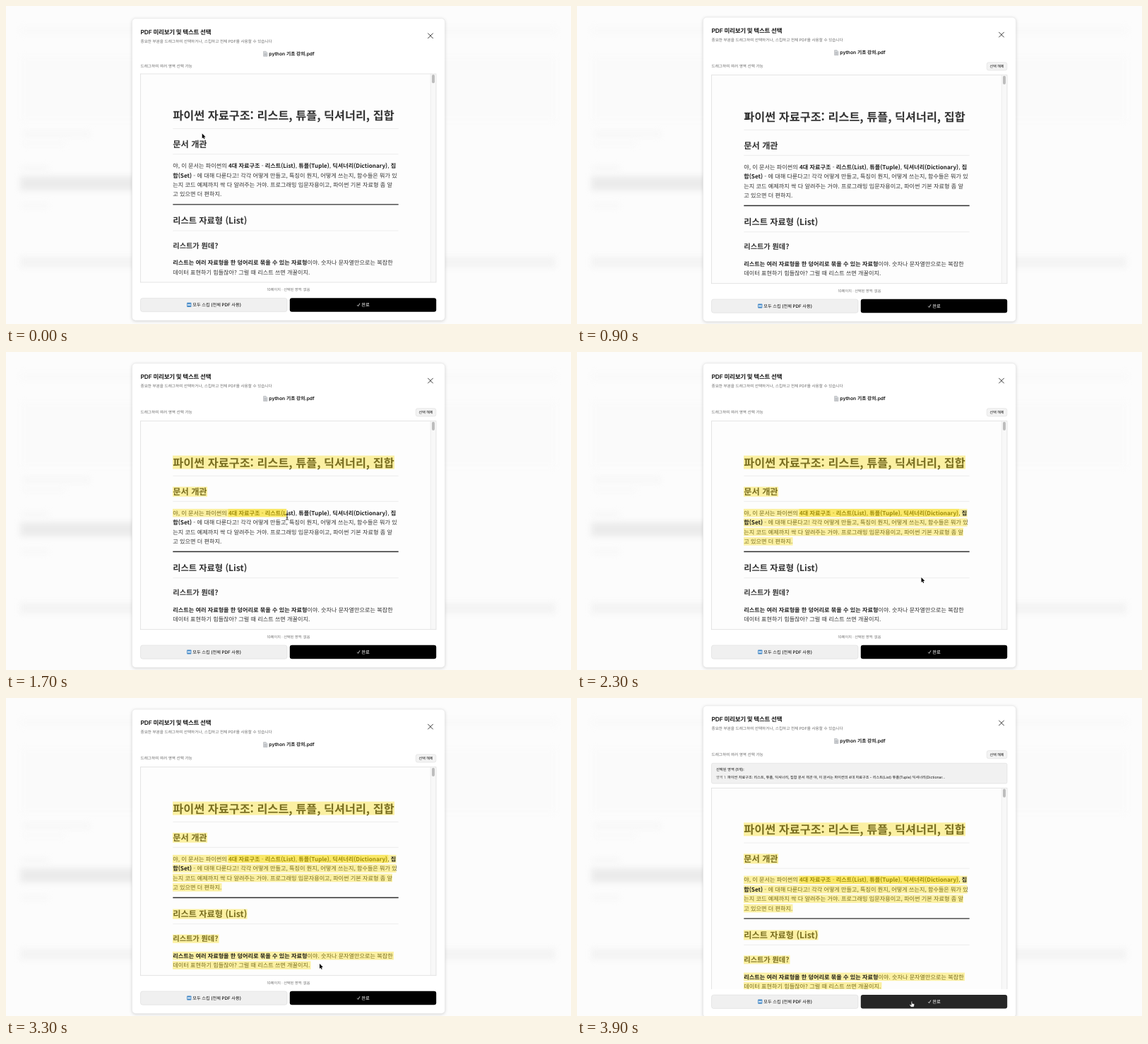
An HTML page that plays this animation: 800 by 450 pixels, repeating every 4000 ms.

```html
<!DOCTYPE html>
<html lang="ko">
<head>
<meta charset="utf-8">
<title>PDF 미리보기</title>
<style>
html, body { margin: 0; width: 100%; height: 100%; overflow: hidden; background: #fcfcfc; }
svg { display: block; }
text { font-family: Inter, 'Noto Sans CJK KR', 'Noto Sans CJK', sans-serif; text-rendering: geometricPrecision; white-space: pre; fill: #111; }
.page text { font-family: 'Noto Sans CJK KR', 'Noto Sans CJK', sans-serif; fill: #333; }
.page tspan { font-weight: 700; fill: #222; }
.title { font-size: 8.5px; font-weight: 600; letter-spacing: -.025em; }
.small { font-size: 5.6px; }
.muted { fill: #6b6b6b; }
.h1 { font-size: 16.28px; font-weight: 700; }
.h2 { font-size: 12.2px; font-weight: 700; }
.h3 { font-size: 10.17px; font-weight: 700; }
.p { font-size: 8.15px; }
.mid { text-anchor: middle; }
.rule { stroke: #e9e9e9; stroke-width: .8; }
.mark { fill: rgb(247, 216, 0); fill-opacity: .36; }
.under { fill: #fdf2a6; mix-blend-mode: multiply; }
#backdrop { filter: blur(4px); }
#modal { filter: drop-shadow(0 1px 2px rgba(0, 0, 0, .15)); }
</style>
</head>
<body>
<svg width="800" height="450" viewBox="0 0 800 450">
  <rect width="800" height="450" fill="#fcfcfc"/>
  <g id="backdrop">
    <rect x="20" y="30" width="760" height="9" fill="#f9f9f9"/>
    <rect x="22" y="72" width="756" height="90" fill="#fafafa"/>
    <rect x="24" y="178" width="94" height="6" fill="#f5f5f5"/>
    <rect x="24" y="192" width="60" height="5" fill="#f8f8f8"/>
    <rect x="22" y="227" width="38" height="5" fill="#f5f5f5"/>
    <rect x="20" y="241" width="300" height="20" fill="#ebebeb"/>
    <rect x="22" y="280" width="38" height="5" fill="#f6f6f6"/>
    <rect x="20" y="355" width="758" height="15" fill="#f3f3f3"/>
  </g>

  <rect id="modal" x="178.5" width="443" rx="5" fill="#fff" stroke="#e4e4e4" stroke-width=".6"/>

  <g id="head">
    <text class="title" x="190.5" y="40">PDF 미리보기 및 텍스트 선택</text>
    <text class="small muted" x="190.5" y="52">중요한 부분을 드래그하여 선택하거나, 스킵하고 전체 PDF를 사용할 수 있습니다</text>
    <path d="M597.3 38.5l7.4 7.4m0-7.4l-7.4 7.4" stroke="#222" stroke-width=".9"/>
    <path d="M364.6 64.2h3.4l2 2v5h-5.4z" fill="#d5d8db" stroke="#9a9ea3" stroke-width=".5"/>
    <path d="M365.6 67.2h3.2m-3.2 1.3h3.2m-3.2 1.3h3.2" stroke="#8b8f94" stroke-width=".4"/>
    <text x="372.3" y="70" font-size="6.75" font-weight="600">python 기초 강의.pdf</text>
  </g>

  <g id="label">
    <text class="small muted" x="190.5" y="87.4">드래그하여 여러 영역 선택 가능</text>
    <g id="clear">
      <rect x="580.3" y="79.8" width="28.5" height="11.2" rx="2.5" fill="#f3f3f3" stroke="#ddd" stroke-width=".6"/>
      <text class="mid" x="594.5" y="87.3" font-size="5.05" font-weight="500">선택 해제</text>
    </g>
  </g>

  <g id="panel">
    <rect x="190.5" y="92.3" width="418.5" height="28.7" rx="2" fill="#f1f1f1" stroke="#dcdcdc" stroke-width=".6"/>
    <text x="197" y="102.5" font-size="5.3" font-weight="500">선택된 영역 (1개):</text>
    <text x="197" y="114.2" font-size="5.17"><tspan class="muted">영역 1: </tspan>파이썬 자료구조: 리스트, 튜플, 딕셔너리, 집합 문서 개관 야, 이 문서는 파이썬의 4대 자료구조 - 리스트(List) 튜플(Tuple) 딕셔너리(Dictionar...</text>
  </g>

  <g id="viewer" class="page">
    <svg x="190.5" y="96" width="418.5" height="295" viewBox="190.5 96 418.5 295">
      <rect x="190" y="95" width="420" height="297" fill="#fdfdfd"/>
      <text class="h1" x="236.3" y="161">파이썬 자료구조: 리스트, 튜플, 딕셔너리, 집합</text>
      <text class="h2" x="236.3" y="200.2">문서 개관</text>
      <text class="p" x="236.3" y="229.1">야, 이 문서는 파이썬의 <tspan>4대 자료구조</tspan> - <tspan>리스트(List)</tspan>, <tspan>튜플(Tuple)</tspan>, <tspan>딕셔너리(Dictionary)</tspan>, <tspan>집</tspan></text>
      <text class="p" x="236.3" y="242.5"><tspan>합(Set)</tspan> - 에 대해 다룬다고! 각각 어떻게 만들고, 특징이 뭔지, 어떻게 쓰는지, 함수들은 뭐가 있</text>
      <text class="p" x="236.3" y="255.9">는지 코드 예제까지 싹 다 알려주는 거야. 프로그래밍 입문자용이고, 파이썬 기본 자료형 좀 알</text>
      <text class="p" x="236.3" y="269.3">고 있으면 더 편하지.</text>
      <text class="h2" x="236.3" y="308.3">리스트 자료형 (List)</text>
      <text class="h3" x="236.3" y="342.5">리스트가 뭔데?</text>
      <text class="p" x="236.3" y="366.2"><tspan>리스트는 여러 자료형을 한 덩어리로 묶을 수 있는 자료형</tspan>이야. 숫자나 문자열만으로는 복잡한</text>
      <text class="p" x="236.3" y="379.6">데이터 표현하기 힘들잖아? 그럴 때 리스트 쓰면 개꿀이지.</text>
      <path class="rule" d="M236.3 173.6h319.4M236.3 209.7h319.4M236.3 318h319.4"/>
      <path d="M236.3 280.8h319.4" stroke="#2c2c2c" stroke-width="1.3"/>
      <g id="marks"></g>
      <rect x="601" y="96" width="8" height="295" fill="#f8f8f8"/>
      <path d="M601.2 96v295" stroke="#e6e6e6" stroke-width=".6"/>
      <rect x="603" y="97" width="4" height="12.3" rx="2" fill="#bdbdbd"/>
    </svg>
    <rect x="190.5" y="96" width="418.5" height="295" fill="none" stroke="#dedede" stroke-width=".8"/>
  </g>

  <text id="status" class="mid muted" x="400" y="403.4" font-size="5.12">10페이지 · 선택된 영역: 없음</text>

  <g id="footer">
    <rect x="179" y="405.3" width="442" height="31" fill="#fff"/>
    <rect x="190.5" y="413.4" width="207.5" height="19.2" rx="3" fill="#f0f0f0" stroke="#dcdcdc" stroke-width=".6"/>
    <rect x="256.2" y="419.8" width="6.2" height="6.2" rx=".8" fill="#3f86c6"/>
    <path d="M257.2 421.2l2 1.7-2 1.7zm2 0l2 1.7-2 1.7zm2 0h.5v3.4h-.5z" fill="#fff"/>
    <text x="264.2" y="425.2" font-size="6.2" font-weight="500">모두 스킵 (전체 PDF 사용)</text>
    <rect id="done" x="401.8" y="413.2" width="207.4" height="19.5" rx="3"/>
    <path d="M497.3 423.2l1.3 1.6 2.4-4" fill="none" stroke="#fff" stroke-width=".8"/>
    <text x="503.2" y="425.2" font-size="6.4" font-weight="500" style="fill:#fff">완료</text>
  </g>

  <g id="cursor">
    <path id="arrow" d="M0 0V7L1.6 5.5 2.6 7.9 3.7 7.4 2.7 5.1H4.9Z" stroke="#fff" stroke-width=".6" paint-order="stroke"/>
    <path id="beam" d="M-2-4Q0-4 0-2.8V2.8Q0 4-2 4M2-4Q0-4 0-2.8M0 2.8Q0 4 2 4M-1 .8h2" fill="none" stroke="#111" stroke-width=".8"/>
    <path id="hand" d="M-.8 0Q0-.8.7 0V2.6L3.2 3.2Q3.9 3.5 3.7 4.6L3 7.6H-1.2L-3.2 4.6Q-3 3.6-2 4.1L-.8 5Z" fill="#fff" stroke="#000" stroke-width=".5"/>
  </g>
</svg>
<script>
const $ = id => document.getElementById(id);
const LOOP = 4000, STEP = 100, LEFT = 236;

// Dialog layouts: before dragging, while dragging, with the selection panel.
const layouts = [
  { top: 17.5, bottom: 445, head: 0, label: 0, viewer: 0, footer: 0 },
  { top: 16, bottom: 446.5, head: -1.6, label: 0, viewer: 1.7, footer: 1.6 },
  { top: 11, bottom: 452, head: -6.8, label: -5.3, viewer: 31.4, footer: 6.8 }
];

// Text lines: centre, highlight height.
const lines = [[154.4, 19], [196, 14], [226, 11.5], [239.4, 11.5], [252.8, 11.5],
  [266.2, 11.5], [304, 14], [339, 12], [363, 11.5], [376.5, 11.5]];

// Highlight runs: line, start, end, class.
const marks = [
  [0, LEFT, 550], [1, LEFT, 285], [2, LEFT, 545], [2, 314.5, 541], [2, 545, 552.5, 'under'],
  [3, LEFT, 264, 'under'], [3, 264, 552.5], [4, LEFT, 547], [5, LEFT, 305.5],
  [6, LEFT, 341.5], [7, LEFT, 301.5], [8, LEFT, 427, 'under'], [8, 427, 549], [9, LEFT, 431.5]
].map(([line, start, end, kind = 'mark']) => {
  const rect = document.createElementNS('http://www.w3.org/2000/svg', 'rect');
  const [centre, height] = lines[line];
  const attrs = { class: kind, x: start, y: centre - height / 2, height };
  for (const name in attrs) rect.setAttribute(name, attrs[name]);
  $('marks').append(rect);
  return { rect, line, start, end };
});

// Selected line count; the fraction is the part of the line the caret is in.
const selection = [[0, 0], [1000, .12], [1100, 1], [1600, 2.47], [1700, 2.51], [1800, 3.56],
  [1900, 3.61], [2000, 4.66], [2100, 6], [2700, 7], [2900, 8.79], [3000, 8.76], [3100, 9.6], [3200, 10]];

const path = [[0, 277.7, 180.4], [600, 240, 156.5], [700, 241.3, 156.5], [900, 241.3, 156.5],
  [1000, 258, 163], [1500, 367.5, 217], [1600, 383, 226], [1800, 413, 241], [2000, 443, 256],
  [2300, 487.5, 319], [2700, 491, 343], [2900, 486, 362], [3300, 444, 376],
  [3400, 445.5, 383], [3800, 468, 416], [3900, 474, 429.6], [4000, 474, 429.6]];

function pointAt(t) {
  const i = path.findIndex(key => key[0] > t);
  const [t0, x0, y0] = path[i - 1], [t1, x1, y1] = path[i];
  const k = (t - t0) / (t1 - t0);
  return [x0 + (x1 - x0) * k, y0 + (y1 - y0) * k];
}

const within = (t, a, b) => t >= a && t <= b;
const show = (id, on) => $(id).style.display = on ? '' : 'none';
const shift = (id, y, x = 0) => $(id).setAttribute('transform', `translate(${x} ${y})`);

function draw(t) {
  const state = t < 900 ? 0 : t < 3400 ? 1 : 2;
  const layout = layouts[state];
  $('modal').setAttribute('y', layout.top);
  $('modal').setAttribute('height', layout.bottom - layout.top);
  for (const id of ['head', 'label', 'viewer', 'footer']) shift(id, layout[id]);
  shift('status', layout.viewer);
  show('clear', state > 0);
  show('panel', state === 2);

  const selected = selection.findLast(key => key[0] <= t)[1];
  for (const { rect, line, start, end } of marks) {
    const part = Math.min(1, Math.max(0, selected - line));
    const caret = part === 1 ? end : LEFT + part * 316;
    rect.setAttribute('width', part ? Math.max(0, Math.min(end, caret) - start) : 0);
  }

  const hover = t >= 3900;
  const overText = within(t, 600, 1000) || within(t, 1600, 2000) || within(t, 2900, 3100);
  $('done').setAttribute('fill', hover ? '#262626' : '#000');
  const [x, y] = pointAt(t);
  shift('cursor', y, x);
  show('hand', hover);
  show('beam', overText);
  show('arrow', !hover && !overText);
}

const origin = performance.now();
function tick() {
  const elapsed = (performance.now() - origin) % LOOP;
  draw(Math.floor(elapsed / STEP) * STEP);
  requestAnimationFrame(tick);
}
tick();
</script>
</body>
</html>
```
